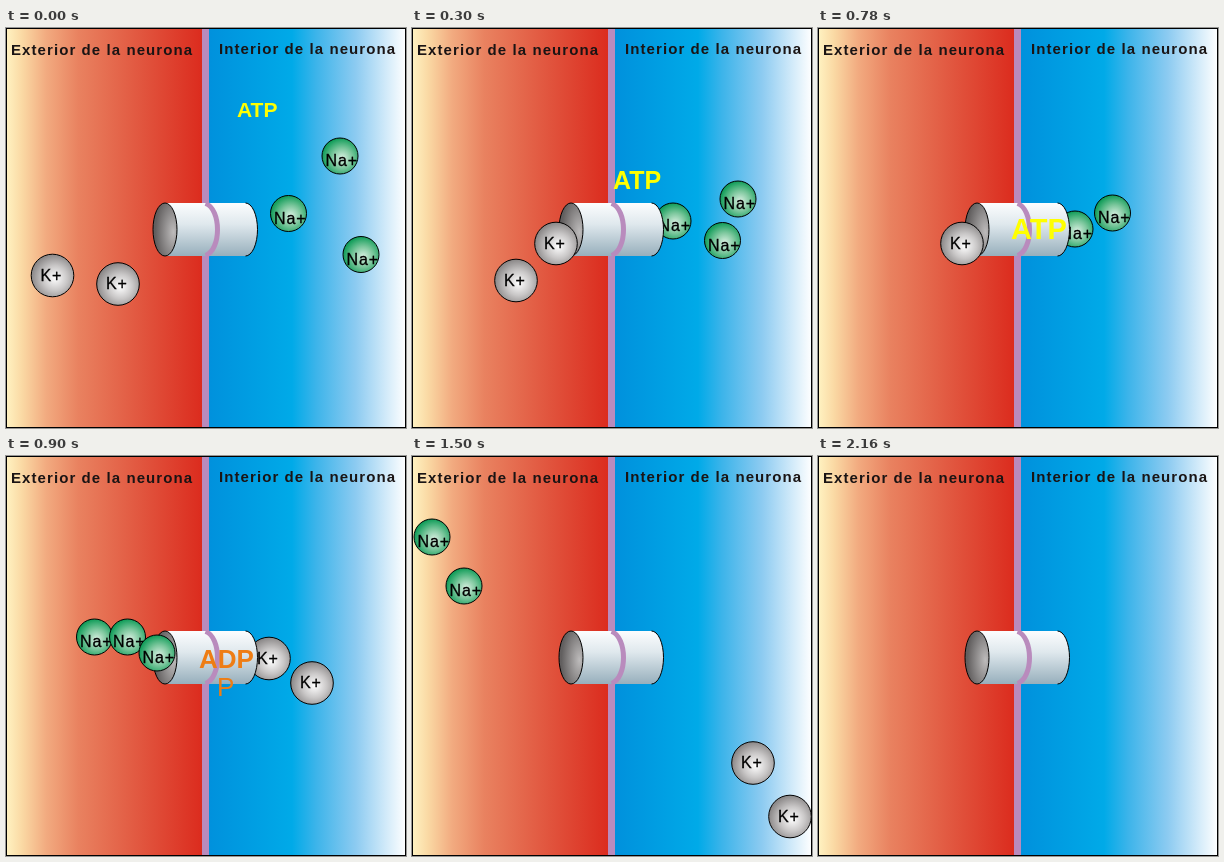
These frames come from a looping animation (400x400 px, 2.4 s). An HTML page:

```html
<!DOCTYPE html>
<html lang="es">
<head>
<meta charset="utf-8">
<title>Bomba de sodio y potasio</title>
<style>
  html, body { margin: 0; width: 100%; height: 100%; overflow: hidden; background: #fff; }
  svg { display: block; width: 100vw; height: 100vh; }
  text { font-family: "Liberation Sans", Arial, sans-serif; }
  .title { font-size: 15px; font-weight: bold; letter-spacing: 1.08px; fill: #1a1414; }
  .label { font-size: 16px; letter-spacing: .9px; fill: #000; stroke: #000; stroke-width: .3; }
  .atp { font-weight: bold; fill: #ffff00; }
  .adp { font-size: 26px; font-weight: bold; fill: #ee7d14; }
  .free { font-size: 26px; fill: #ee7d14; }
  .edge { stroke: #000; stroke-width: 1; }

  /* Each pose holds for one eighth of the loop; the last two eighths are empty. */
  .pose {
    visibility: hidden;
    animation: show 2400ms step-end infinite;
    animation-delay: calc(var(--n) * 300ms - 2400ms);
  }
  .p0 { --n: 0; } .p1 { --n: 1; } .p2 { --n: 2; }
  .p3 { --n: 3; } .p4 { --n: 4; } .p5 { --n: 5; }
  @keyframes show {
    0% { visibility: visible; }
    12.5%, 100% { visibility: hidden; }
  }
</style>
</head>
<body>
<svg viewBox="0 0 400 400">
  <defs>
    <linearGradient id="outside">
      <stop offset="0" stop-color="#fff3c2"/>
      <stop offset=".08" stop-color="#fad9a4"/>
      <stop offset=".2" stop-color="#f2ab80"/>
      <stop offset=".36" stop-color="#e98260"/>
      <stop offset=".68" stop-color="#e1553e"/>
      <stop offset="1" stop-color="#db291c"/>
    </linearGradient>
    <linearGradient id="inside">
      <stop offset="0" stop-color="#0090dc"/>
      <stop offset=".43" stop-color="#00aae8"/>
      <stop offset=".55" stop-color="#3cb4ea"/>
      <stop offset=".75" stop-color="#8dcbf1"/>
      <stop offset="1" stop-color="#fff"/>
    </linearGradient>
    <linearGradient id="metal" x2="0" y2="1">
      <stop offset="0" stop-color="#fcfdfe"/>
      <stop offset=".4" stop-color="#dfe8ed"/>
      <stop offset="1" stop-color="#97afbc"/>
    </linearGradient>
    <radialGradient id="mouth" cx=".85" cy=".55" r=".75">
      <stop offset="0" stop-color="#bdbbbb"/>
      <stop offset="1" stop-color="#625f5f"/>
    </radialGradient>
    <radialGradient id="green" cx=".56" cy=".56" r=".56">
      <stop offset="0" stop-color="#d9f0e2"/>
      <stop offset=".5" stop-color="#7cc79d"/>
      <stop offset="1" stop-color="#0f9c58"/>
    </radialGradient>
    <radialGradient id="gray" cx=".56" cy=".56" r=".58">
      <stop offset="0" stop-color="#fff"/>
      <stop offset=".5" stop-color="#c9c7c7"/>
      <stop offset="1" stop-color="#858282"/>
    </radialGradient>
    <g id="na">
      <circle class="edge" r="18" fill="url(#green)"/>
      <text class="label" x="-14.5" y="10">Na+</text>
    </g>
    <g id="k">
      <circle class="edge" r="21.3" fill="url(#gray)"/>
      <text class="label" x="-12" y="5">K+</text>
    </g>
  </defs>

  <rect width="200" height="400" fill="url(#outside)"/>
  <rect x="200" width="200" height="400" fill="url(#inside)"/>
  <path d="M199.5 0V400" stroke="#b98bbd" stroke-width="7"/>
  <rect class="edge" x=".5" y=".5" width="399" height="399" fill="none"/>
  <text class="title" x="5" y="27">Exterior de la neurona</text>
  <text class="title" x="213" y="26">Interior de la neurona</text>

  <!-- ions hidden partly by the channel -->
  <use class="pose p1" href="#na" x="261" y="193"/>
  <use class="pose p2" href="#na" x="257" y="201"/>
  <use class="pose p3" href="#k" x="263" y="202.5"/>

  <g id="channel">
    <path d="M159 175H239.5A12 26.5 0 0 1 239.5 228H159Z" fill="url(#metal)"/>
    <path class="edge" d="M239.5 175A12 26.5 0 0 1 239.5 228" fill="none"/>
    <ellipse class="edge" cx="159" cy="201.5" rx="12" ry="26.5" fill="url(#mouth)"/>
    <path d="M199.5 175.5C215.500 181 215.500 222 199.5 227.500" fill="none" stroke="#b98bbd" stroke-width="5"/>
  </g>

  <g class="pose p0">
    <use href="#na" x="334" y="128"/>
    <use href="#na" x="282.500" y="185.500"/>
    <use href="#na" x="355" y="226.500"/>
    <use href="#k" x="46.500" y="247.500"/>
    <use href="#k" x="112" y="256"/>
    <text class="atp" x="231" y="89" font-size="21">ATP</text>
  </g>
  <g class="pose p1">
    <use href="#na" x="326" y="171"/>
    <use href="#na" x="310.500" y="212.500"/>
    <use href="#k" x="104" y="252.500"/>
    <use href="#k" x="144" y="215.500"/>
    <text class="atp" x="201" y="161" font-size="25">ATP</text>
  </g>
  <g class="pose p2">
    <use href="#na" x="294.500" y="185"/>
    <use href="#k" x="144" y="215.500"/>
    <text class="atp" x="193" y="211" font-size="29">ATP</text>
  </g>
  <g class="pose p3">
    <use href="#na" x="88.500" y="181"/>
    <use href="#na" x="121.500" y="181"/>
    <use href="#na" x="151" y="197"/>
    <use href="#k" x="306" y="227"/>
    <text class="adp" x="193" y="212">ADP</text>
    <text class="free" x="211" y="240">P</text>
  </g>
  <g class="pose p4">
    <use href="#na" x="39" y="124"/>
    <use href="#na" x="81" y="159.500"/>
    <use href="#na" x="113.500" y="201"/>
    <use href="#k" x="311" y="261.500"/>
    <use href="#k" x="359" y="327.500"/>
    <text class="adp" x="224" y="270">ADP</text>
    <text class="free" x="269.500" y="316">P</text>
  </g>
  <g class="pose p5">
    <use href="#na" x="20" y="81"/>
    <use href="#na" x="52" y="130"/>
    <use href="#k" x="341" y="307"/>
    <use href="#k" x="378" y="360.500"/>
  </g>
</svg>
</body>
</html>
```
